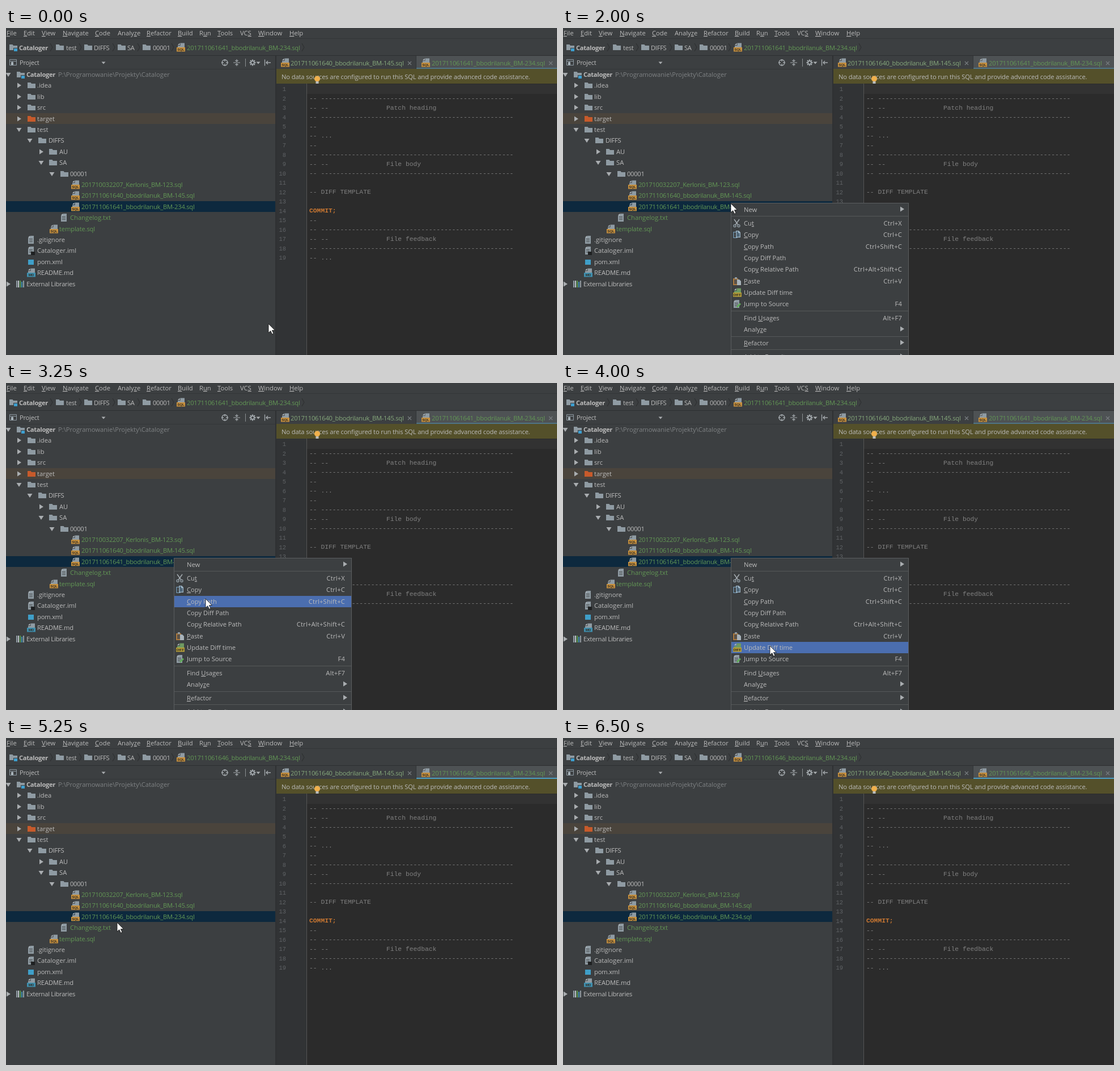
An HTML page for the animation above (6750 ms loop, 972 by 576 pixels).

```html
<!DOCTYPE html>
<html lang="en">
<head>
<meta charset="utf-8">
<title>Update diff time</title>
<style>
html, body { margin: 0; width: 100%; height: 100%; overflow: hidden; background: #3c3f41; }
svg { display: block; width: 972px; height: 576px; }
text { font: 11.2px "Open Sans", "Noto Sans", sans-serif; white-space: pre; }
.code { font: 11.33px "Liberation Mono", "DejaVu Sans Mono", monospace; }
.num { font: 10.4px "Liberation Mono", "DejaVu Sans Mono", monospace; }
.tag { font: bold 6.2px "Liberation Sans", Arial, sans-serif; }
.bold { font-weight: 700; }
.u { text-decoration: underline; }
</style>
</head>
<body>
<svg id="stage" viewBox="0 0 972 576"></svg>
<script>
const FG = '#bbbbbb', GREEN = '#629755', GRAY = '#8f9ba3', PANEL = '#3c3f41';
const ORANGE = '#c9923f', TEAL = '#3f8fae', LEAF = '#58974f', RED = '#cc5a2c';
const fileName = minute => `2017110616${minute}_bbodrilanuk_BM-234.sql`;

// Drawing helpers: each returns markup; y is the vertical middle of the row.
const rect = (x, y, w, h, c, more = '') => `<rect x="${x}" y="${y}" width="${w}" height="${h}" fill="${c}" ${more}/>`;
const path = (d, c, x = 0, y = 0) => `<path d="${d}" fill="${c}" transform="translate(${x} ${y})"/>`;
const line = (d, c, x = 0, y = 0, w = 1) =>
  `<path d="${d}" fill="none" stroke="${c}" stroke-width="${w}" transform="translate(${x} ${y})"/>`;
const mark = s => s.replace(/</g, '&lt;').replace(/\^(.)/, '<tspan class="u">$1</tspan>');
const text = (x, y, s, c = FG, ls = 0, more = '') =>
  `<text x="${x}" y="${Math.round(y + 4)}" fill="${c}" letter-spacing="${ls}" ${more}>${mark(s)}</text>`;

const down = (x, y) => path('M-4.5-3h9L0 4z', '#a9adb0', x, y);
const right = (x, y) => path('M-3-4.5V4.5L4 0z', '#a9adb0', x, y);
const small = (x, y) => path('M-3.5-1.5h7L0 2.5z', '#a9adb0', x, y);

const icons = {
  folder: (x, y, c = GRAY) => path('M0-5h5.5l1.5 2h7v8H0z', c, x, y),
  module: (x, y) => icons.folder(x, y) + rect(x + 7, y + 1, 8, 7, PANEL) + rect(x + 8, y + 2, 6, 5, '#3d9fd0'),
  page: (x, y) => path('M5-7h6V7H1V-3z', GRAY, x, y) + path('M4-7v3H1z', '#b3bcc2', x, y) +
    line('M3-1.5h6M3 1h6M3 3.5h6', '#4b5052', x, y),
  badge: (x, y, tag, c, top = GRAY) => path('M6.5-7.5H14v8H2v-3.5h4.5z', top, x, y) +
    path('M5.5-7.5v3.5H2z', '#b3bcc2', x, y) + rect(x, y, 15, 7.5, c) +
    `<text class="tag" x="${x + 7.5}" y="${y + 6.1}" text-anchor="middle" fill="#2f2a22">${mark(tag)}</text>`,
  sql: (x, y) => icons.badge(x, y, 'SQL', ORANGE),
  diff: (x, y) => icons.badge(x, y, 'DIFF', '#b8a03a', '#6f9a62'),
  fxml: (x, y) => icons.badge(x, y, '<>', ORANGE),
  html: (x, y) => icons.badge(x, y, 'H', LEAF),
  css: (x, y) => icons.badge(x, y, 'CSS', LEAF),
  js: (x, y) => icons.badge(x, y, 'JS', RED),
  ts: (x, y) => icons.badge(x, y, 'TS', TEAL),
  md: (x, y) => icons.badge(x, y, 'MD', TEAL),
  cup: (x, y) => icons.badge(x, y, '', TEAL),
  cfml: (x, y) => rect(x + 1, y - 6, 13, 13, '#e4ebef'),
  maven: (x, y) => rect(x + 1, y - 4, 10, 9, '#3f9fc9'),
  iml: (x, y) => icons.page(x, y) + rect(x + 6, y + 2, 7, 6, '#1f2122'),
  scratch: (x, y) => icons.page(x, y) + `<circle cx="${x + 10}" cy="${y + 4}" r="4" fill="#c5d4de"/>` +
    line('M10 1.5V4h2', '#35506a', x, y),
  libs: (x, y) => rect(x, y - 6, 2, 12, GRAY) + rect(x + 3, y - 6, 2, 12, '#c0c8cd') +
    rect(x + 6, y - 6, 2, 12, LEAF) + rect(x + 9, y - 4, 2, 10, TEAL) + rect(x + 12, y - 6, 2, 12, GRAY),
  cut: (x, y) => line('M2-7L9 3M11-7L4 3', '#a8afb4', x, y, 1.4) +
    line('M1 4.5a2 2 0 1 0 4 0a2 2 0 1 0-4 0M8 4.5a2 2 0 1 0 4 0a2 2 0 1 0-4 0', GRAY, x, y, 1.4),
  copy: (x, y) => line('M1-4.5h6v10H1z', '#7ba3c0', x, y, 1.2) + path('M5-7h5l3 3v9H5z', '#9fb6c6', x, y) +
    path('M6.2-5.8H9v3h2.8v6.6H6.2z', '#4e6577', x, y),
  paste: (x, y) => rect(x, y - 5, 9, 12, '#a9783f') + rect(x + 2, y - 3, 5, 8, '#5a5148') + rect(x + 3, y - 7, 4, 3, GRAY) +
    path('M7-3h4l3 3v7H7z', '#a9b3ba', x, y),
  jump: (x, y) => icons.page(x, y) + line('M7 5.5L13-.5', '#5fae58', x, y, 2.6),
};

const treeRows = [
  // [arrow x (negative = closed), icon, icon x, label x, label, colour, spacing]
  [4, 'module', 19],
  [-23, 'folder', 38, 55, '.idea'], [-23, 'folder', 38, 55, 'lib'], [-23, 'folder', 38, 55, 'src'],
  [-23, 'folder', 38, 55, 'target'], [23, 'folder', 38, 55, 'test'],
  [42, 'folder', 57, 75, 'DIFFS', FG, -.35], [-62, 'folder', 76, 94, 'AU'], [62, 'folder', 76, 94, 'SA'],
  [81, 'folder', 96, 113, '00001', FG, -.3],
  [0, 'sql', 115, 133, '201710032207_Kerlonis_BM-123.sql', GREEN, -.28],
  [0, 'sql', 115, 133, '201711061640_bbodrilanuk_BM-145.sql', GREEN, -.25],
  [0, 'sql', 115],
  [0, 'page', 96, 113, 'Changelog.txt', GREEN], [0, 'sql', 77, 94, 'template.sql', GREEN, -.15],
  [0, 'page', 38, 55, '.gitignore'], [0, 'iml', 38, 55, 'Cataloger.iml'], [0, 'maven', 38, 55, 'pom.xml', FG, -.2],
  [0, 'md', 37, 55, 'README.md', FG, -.1], [-4, 'libs', 18, 36, 'External Libraries', FG, -.26],
];

function drawTree() {
  const rows = treeRows.map(([arrow, icon, ix, tx, label, c, ls], i) => {
    const y = Math.round(82 + i * 19.4);
    return (arrow > 0 ? down(arrow, y) : arrow < 0 ? right(-arrow, y) : '') +
      icons[icon](ix, y, label === 'target' ? '#c75a2b' : undefined) + (label ? text(tx, y, label, c, ls) : '');
  });
  return rect(0, 150, 475, 19, '#4a443c') + rect(0, 305, 475, 19, '#0d293e') + rows.join('') +
    text(36, 82, 'Cataloger', FG, -.3, 'class="bold"') +
    text(92, 82, 'P:\\Programowanie\\Projekty\\Cataloger', '#7f8284') +
    text(133, 315, '', GREEN, -.25, 'id="treeName"');
}

function drawTop() {
  const menu = [[1, '^File'], [31, '^Edit'], [63, '^View'], [100, '^Navigate'], [157, '^Code'], [197, 'Analy^ze'],
    [248, '^Refactor'], [303, '^Build'], [341, 'R^un'], [373, '^Tools'], [413, 'VC^S'], [445, '^Window'], [500, '^Help']];
  const crumbs = [[88, 106, 'test'], [138, 155, 'DIFFS'], [197, 214, 'SA'], [241, 259, '00001']];
  return menu.map(([x, s]) => text(x, 9, s)).join('') +
    rect(0, 18, 972, 1, '#333638') + rect(0, 48, 972, 1, '#2d2f31') +
    icons.module(6, 34) + text(23, 35, 'Cataloger', FG, -.3, 'class="bold"') +
    crumbs.map(([ix, tx, s]) => icons.folder(ix, 34) + text(tx, 35, s, FG, -.3)).join('') +
    [80, 131, 190, 234, 294, 524].map(x => line('M-2-7L2 0L-2 7', '#2b2d2e', x, 34)).join('') +
    icons.sql(301, 34) + text(319, 35, '', GREEN, -.25, 'id="crumbName"');
}

function drawHeader() {
  const gear = [0, 45, 90, 135].map(a =>
    `<path d="M0-5.5V5.5" stroke="#a5abaf" stroke-width="2.2" transform="translate(435 61) rotate(${a})"/>`);
  return rect(0, 72, 475, 1, '#343739') +
    line('M.5-5.5h12v10H.5zM.5-2.5h12M5-2.5v7', GRAY, 6, 61) + rect(9, 60, 4, 5, '#a9b4bb') +
    text(24, 61, 'Project', FG, -.25) + small(172, 61) +
    line('M-5 0a5 5 0 1 0 10 0a5 5 0 1 0-10 0M-6 0h4M2 0h4M0-6v4M0 2v4', '#a5abaf', 386, 61, 1.3) +
    line('M-6 0H6M0-6v4M0 2v4M-2.5-4L0-2L2.5-4M-2.5 4L0 2L2.5 4', '#a5abaf', 407, 61, 1.2) +
    rect(422, 54, 1, 14, '#8b8f91') + gear.join('') + `<circle cx="435" cy="61" r="2" fill="${PANEL}"/>` +
    small(445, 61) + line('M-4.5-5.5v11M-2 0H6M1-3L-2 0L1 3', '#a5abaf', 461, 61, 1.3);
}

function drawEditor() {
  const rule = '-- ' + '-'.repeat(50);
  const title = s => '-- --' + ' '.repeat(15) + s;
  const lines = ['', rule, title('Patch heading'), rule, '--', '-- ...', '--', rule, title('File body'), rule, '',
    '-- DIFF TEMPLATE', '', 'COMMIT;', '--', rule, title('File feedback'), rule, '-- ...'];
  const code = lines.map((s, i) => {
    const y = 106.6 + i * 16.5, key = s === 'COMMIT;';
    return text(494, y + .8, String(i + 1), '#606366', 0, 'class="num" text-anchor="end"') +
      text(535, y, s, key ? '#cc7832' : '#808080', 0, `class="code ${key ? 'bold' : ''}"`);
  });
  const close = x => line('M-3-3L3 3M3-3L-3 3', '#777c7f', x, 62, 1.2);
  return rect(475, 49, 2, 527, '#2f3133') + rect(477, 98, 53, 478, '#313335') + rect(530, 98, 442, 478, '#2b2b2b') +
    rect(531, 99, 441, 17, '#323232') + rect(530, 98, 1, 478, '#555555') +
    rect(477, 49, 247, 23, '#3c3f41') + rect(723, 49, 1, 23, '#323537') + rect(724, 49, 248, 23, '#4e5254') +
    rect(724, 70, 248, 2, '#4f7487', 'id="tabLine"') +
    icons.sql(485, 61) + text(502, 62, '201711061640_bbodrilanuk_BM-145.sql', '#86a97c', -.25) + close(712) +
    icons.sql(733, 61) + text(751, 62, '', GREEN, -.25, 'id="tabName"') + close(961) +
    rect(477, 72, 495, 26, '#54502a') +
    text(486, 86, 'No data sources are configured to run this SQL and provide advanced code assistance.', FG, -.13) +
    code.join('') +
    `<circle cx="549" cy="89.5" r="5" fill="#f0b04c"/>` + rect(546.5, 94, 5, 4, '#b9bcbd') +
    rect(535, 99, 2, 16, FG, 'id="caret"');
}

const menuItems = [
  // [y, label, icon, shortcut, opens a submenu]
  [320, 'New', '', '', 1], [344, 'Cu^t', 'cut', 'Ctrl+X'], [364, '^Copy', 'copy', 'Ctrl+C'],
  [385, '^Copy Path', '', 'Ctrl+Shift+C'], [405, 'Copy Diff Path'], [425, 'Cop^y Relative Path', '', 'Ctrl+Alt+Shift+C'],
  [446, '^Paste', 'paste', 'Ctrl+V'], [466, 'Update Diff time', 'diff'], [486, '^Jump to Source', 'jump', 'F4'],
  [511, 'Find ^Usages', '', 'Alt+F7'], [531, 'Analy^ze', '', '', 1], [555, '^Refactor', '', '', 1],
  [579, 'Add to F^avorites', '', '', 1],
];
const newItems = [
  [318, 'File', 'page'], [338, 'Named diff', 'diff'], [358, 'Scratch File', 'scratch', 'Ctrl+Alt+Shift+Insert'],
  [379, 'Directory', 'folder'], [399, 'FXML File', 'fxml'], [423, 'HTML File', 'html'], [444, 'Stylesheet', 'css'],
  [464, 'JavaScript File', 'js'], [484, 'TypeScript File', 'ts'], [505, 'CFML/CFC file', 'cfml'],
  [525, 'CoffeeScript File', 'cup'], [545, '1', 'page'], [566, 'XSLT Stylesheet', 'fxml'],
];

function drawMenu(id, x, y, w, items, seps, hover = '') {
  const rows = items.map(([my, label, icon, keys, sub]) =>
    (icon ? icons[icon](x + 4, my) : '') + text(x + 23, my, label) +
    (keys ? text(x + w - 12, my, keys, FG, .2, 'text-anchor="end"') : '') + (sub ? right(x + w - 12, my - 1) : ''));
  return `<g id="${id}">` + rect(x + .5, y + .5, w - 1, 600, PANEL, 'stroke="#5a5d5f"') + hover +
    seps.map(s => rect(x + 1, s, w - 2, 1, '#555859')).join('') + rows.join('') + '</g>';
}

document.getElementById('stage').innerHTML =
  rect(0, 0, 972, 576, PANEL) + drawTop() + drawHeader() + drawTree() + drawEditor() +
  drawMenu('menu', 296, 308, 314, menuItems, [331, 498, 543, 566], rect(297, 0, 312, 20, '#4b6eaf', 'id="hover"')) +
  drawMenu('newMenu', 606, 307, 235, newItems, [410]) +
  '<path id="cursor" d="M0 0V16L3.8 12.6L6.5 18.3L9 17.2L6.4 11.6H11.4Z" fill="#fff" stroke="#111" stroke-width=".8"/>';

// Each step changes only the parts it names.
const steps = [
  { at: 0, cursor: [463, 521], focus: 0, caret: 0, menu: 0, sub: 0, hover: -1, file: 41, crumb: 41 },
  { at: 250, cursor: [365, 423] },
  { at: 500, cursor: [311, 330] },
  { at: 750, cursor: [296, 309] },
  { at: 1250, focus: 1, caret: 1 },
  { at: 1500, focus: 0, caret: 0, menu: 1 },
  { at: 2750, cursor: [330, 335], hover: 0 },
  { at: 3000, cursor: [342, 346], sub: 1 },
  { at: 3250, cursor: [352, 380], sub: 0, hover: 3 },
  { at: 3500, cursor: [361, 425], hover: 5 },
  { at: 3750, cursor: [365, 472], hover: 7 },
  { at: 4000, cursor: [365, 463] },
  { at: 4250, menu: 0, hover: -1, focus: 1 },
  { at: 4500, file: 46 },
  { at: 4750, cursor: [352, 447], crumb: 46 },
  { at: 5000, cursor: [203, 336] },
  { at: 5250, cursor: [196, 325] },
  { at: 6000, cursor: [430, 528] },
  { at: 6250, cursor: null },
];
const LOOP = 6750;
const el = id => document.getElementById(id);
const show = (id, on) => el(id).setAttribute('visibility', on ? 'visible' : 'hidden');

function render(t) {
  const s = Object.assign({}, ...steps.filter(step => step.at <= t));
  show('cursor', s.cursor);
  if (s.cursor) el('cursor').setAttribute('transform', `translate(${s.cursor})`);
  show('menu', s.menu);
  show('newMenu', s.sub);
  show('hover', s.hover >= 0);
  if (s.hover >= 0) el('hover').setAttribute('y', menuItems[s.hover][0] - 10);
  show('caret', s.caret);
  el('tabLine').setAttribute('fill', s.focus ? '#4a9cc4' : '#4f7487');
  el('treeName').textContent = el('tabName').textContent = fileName(s.file);
  el('crumbName').textContent = fileName(s.crumb);
}

const start = performance.now();
function tick() {
  render((performance.now() - start) % LOOP);
  requestAnimationFrame(tick);
}
tick();
</script>
</body>
</html>
```
